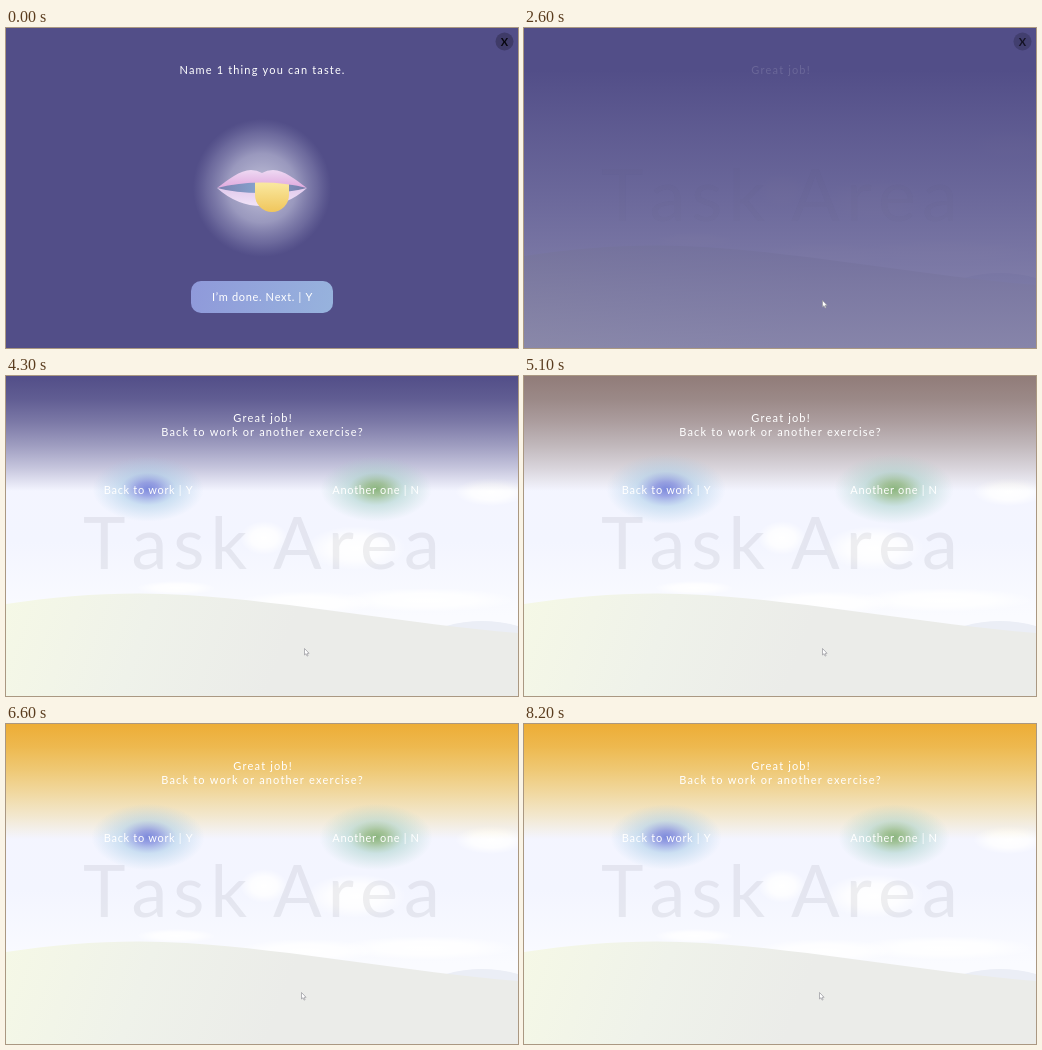
An HTML page with a canvas for the animation above (8300 ms loop, 512 by 320 pixels).

```html
<!DOCTYPE html>
<html lang="en">
<head>
<meta charset="utf-8">
<title>Grounding exercise</title>
<style>
  html, body { margin: 0; width: 100%; height: 100%; overflow: hidden; background: #524e88; }
  canvas { display: block; }
</style>
</head>
<body>
<canvas id="stage" width="512" height="320"></canvas>
<script>
const W = 512, H = 320, LOOP = 8300, STEP = 100;
const ctx = document.getElementById('stage').getContext('2d');
const clamp = v => Math.max(0, Math.min(1, v));
const ramp = (t, a, b) => clamp((t - a) / (b - a));
const mix = (a, b, p) => a + (b - a) * p;

// Piecewise linear value: keys are [time, value] pairs.
function track(t, keys) {
  for (let i = 1; i < keys.length; i++) {
    const [t0, v0] = keys[i - 1], [t1, v1] = keys[i];
    if (t <= t1) return mix(v0, v1, ramp(t, t0, t1));
  }
  return keys[keys.length - 1][1];
}

function linear(x0, y0, x1, y1, ...colors) {
  const g = ctx.createLinearGradient(x0, y0, x1, y1);
  colors.forEach((c, i) => g.addColorStop(i / (colors.length - 1), c));
  return g;
}

function glow(x, y, rx, ry, stops) {
  const g = ctx.createRadialGradient(0, 0, 0, 0, 0, 1);
  stops.forEach(([at, color]) => g.addColorStop(at, color));
  ctx.save();
  ctx.translate(x, y);
  ctx.scale(rx, ry);
  ctx.fillStyle = g;
  ctx.fillRect(-1, -1, 2, 2);
  ctx.restore();
}

function fillPath(d, style) {
  ctx.fillStyle = style;
  ctx.fill(new Path2D(d));
}

function text(str, x, y, { size = 11, spacing = 1.15, align = 'center', color = '#fff', weight = 400 } = {}) {
  ctx.font = `${weight} ${size}px Lato, sans-serif`;
  ctx.letterSpacing = spacing + 'px';
  ctx.fontKerning = 'none';
  ctx.textAlign = align;
  ctx.fillStyle = color;
  ctx.fillText(str, x, y);
}

const label = (str, x, y) => text(str, x, y, { spacing: .65 });

function withAlpha(alpha, draw) {
  if (alpha <= 0) return;
  ctx.save();
  ctx.globalAlpha = alpha;
  draw();
  ctx.restore();
}

const clouds = [
  [258, 162, 24, 17], [350, 172, 50, 22], [485, 116, 36, 14],
  [420, 224, 90, 12], [300, 227, 70, 12], [170, 212, 40, 7]
];

function landscape() {
  ctx.fillStyle = linear(0, 90, 0, 240, '#f4f5ff', '#f3f5ff', '#fafbff');
  ctx.fillRect(0, 0, W, H);
  for (const [x, y, rx, ry] of clouds)
    glow(x, y, rx, ry, [[0, '#fff'], [.55, 'rgba(255,255,255,.8)'], [1, 'rgba(255,255,255,0)']]);
  fillPath('M440 250Q476 240 512 250V270H440Z', '#ebeef6');
  fillPath('M0 228C60 219 120 215 180 219C290 226 400 248 512 257V320H0Z',
    linear(0, 225, 260, 320, '#f5f8e6', '#eff2ea', '#ebece9'));
}

function sky(t) {
  const slope = track(t, [[800, 0], [1400, .0006], [2700, .0013], [3400, .0036], [4300, .0087]]);
  const top = track(t, [[3400, 42], [4300, 0]]);
  const power = track(t, [[3400, 1], [4300, 1.5]]);
  const tint = (purple, blend, orange) =>
    purple.map((c, i) => Math.round(track(t, [[4400, c], [5800, blend[i]], [6500, orange[i]]])));
  const upper = tint([82, 78, 136], [207, 170, 106], [237, 173, 54]);
  const lower = tint([82, 78, 136], [215, 185, 125], [238, 203, 92]);
  const end = Math.min(H, top + 1 / Math.max(slope, 1e-6));
  const stops = [0, .2, .4, .6, .8, 1].map(p => {
    const rgb = upper.map((c, i) => mix(c, lower[i], p));
    return `rgba(${rgb},${clamp(1 - (slope * (end - top) * p) ** power)})`;
  });
  ctx.fillStyle = linear(0, top, 0, end, ...stops);
  ctx.fillRect(0, 0, W, H);
}

function mouth(t) {
  const swing = (1 - Math.cos(t / 1400 * Math.PI)) / 2;
  const r = mix(69, 52, swing);
  glow(256, 160, r, r, [
    [0, 'rgba(225,226,240,.8)'], [.5, 'rgba(205,206,228,.58)'],
    [.8, 'rgba(180,180,212,.27)'], [1, 'rgba(160,160,200,0)']
  ]);
  fillPath('M211 160Q256 148 301 160Q256 172 211 160Z',
    linear(211, 0, 301, 0, '#7d80b0', '#86a6d0', '#787ba9'));
  fillPath('M211 160Q229 165 256 165Q283 165 301 160Q281 178 256 178Q231 178 211 160Z',
    linear(0, 162, 0, 178, '#e3cdee', '#f1e3f8'));

  const x = mix(266, 242.5, swing), half = mix(17, 13.5, swing), bottom = mix(184, 176, swing);
  const bend = bottom - half;
  fillPath(`M${x - half} 153H${x + half}V${bend}A${half} ${half} 0 0 1 ${x - half} ${bend}Z`,
    linear(0, 153, 0, bottom, '#faeaa4', '#f0c65c'));

  fillPath('M211 160C222 152 234 142 245 142Q251 142 256 145Q261 142 267 142C278 142 290 152 301 160Q280 154.5 256 154.5Q232 154.5 211 160Z',
    linear(0, 142, 0, 158, '#eed9f3', '#e2aee0'));
}

function taskScreen(t) {
  text('Name 1 thing you can taste.', 256.5, 46);
  mouth(t);
  ctx.fillStyle = linear(185, 253, 327, 285, '#8f99da', '#97b3dd');
  ctx.beginPath();
  ctx.roundRect(185, 253, 142, 32, 10);
  ctx.fill();
  label('I’m done. Next. | Y', 256.5, 273);
}

function closeButton() {
  ctx.fillStyle = '#3f3b68';
  ctx.beginPath();
  ctx.arc(498.5, 13.5, 9, 0, 7);
  ctx.fill();
  text('X', 498.5, 17.5, { spacing: 0, weight: 700, color: '#08070f' });
}

function choices(t) {
  const pulse = 1 + .04 * Math.cos((t - 3300) / 1000 * Math.PI);
  const blob = (x, core, middle) => glow(x, 113, 58 * pulse, 34 * pulse, [
    [0, `rgba(${core},.9)`], [.2, `rgba(${core},.68)`], [.5, `rgba(${middle},.5)`],
    [.78, `rgba(${middle},.22)`], [1, `rgba(${middle},0)`]
  ]);
  blob(142, '112,126,216', '165,203,230');
  blob(370, '128,174,112', '165,208,200');
  label('Back to work | Y', 142.5, 118);
  label('Another one | N', 370, 118);
}

function cursor(t) {
  if (t < 500) return;
  const x = track(t, [[500, 306], [1100, 295], [1600, 295], [2100, 298], [5900, 298], [6400, 295]]);
  const y = track(t, [[500, 296], [1100, 264], [1600, 264], [2100, 272], [5900, 272], [6400, 268]]);
  ctx.save();
  ctx.translate(x + .5, y + .5);
  const arrow = new Path2D('M0 0V6.5L1.5 5.2L2.6 7.6L3.6 7.1L2.6 4.8H4.6Z');
  ctx.fillStyle = '#fff';
  ctx.fill(arrow);
  ctx.strokeStyle = '#95959b';
  ctx.lineWidth = .7;
  ctx.stroke(arrow);
  ctx.restore();
}

function draw(t) {
  landscape();
  sky(t);
  withAlpha(ramp(t, 2400, 3300), () => {
    const style = { size: 72, spacing: 6, align: 'left', color: 'rgba(50,50,60,.08)' };
    text('Task', 77, 193, style);
    text('Area', 267, 193, style);
  });
  withAlpha(1 - ramp(t, 1900, 2500), () => taskScreen(t));
  withAlpha(track(t, [[2000, 1], [3400, .5], [3900, 0]]), closeButton);
  withAlpha(ramp(t, 2500, 3200), () => text('Great job!', 257, 46));
  withAlpha(ramp(t, 2700, 3700), () => text('Back to work or another exercise?', 256.5, 60));
  withAlpha(ramp(t, 2700, 3700), () => choices(t));
  cursor(t);
}

function frame() {
  const t = performance.now() % LOOP;
  draw(Math.floor(t / STEP) * STEP);
  requestAnimationFrame(frame);
}
frame();
</script>
</body>
</html>
```
